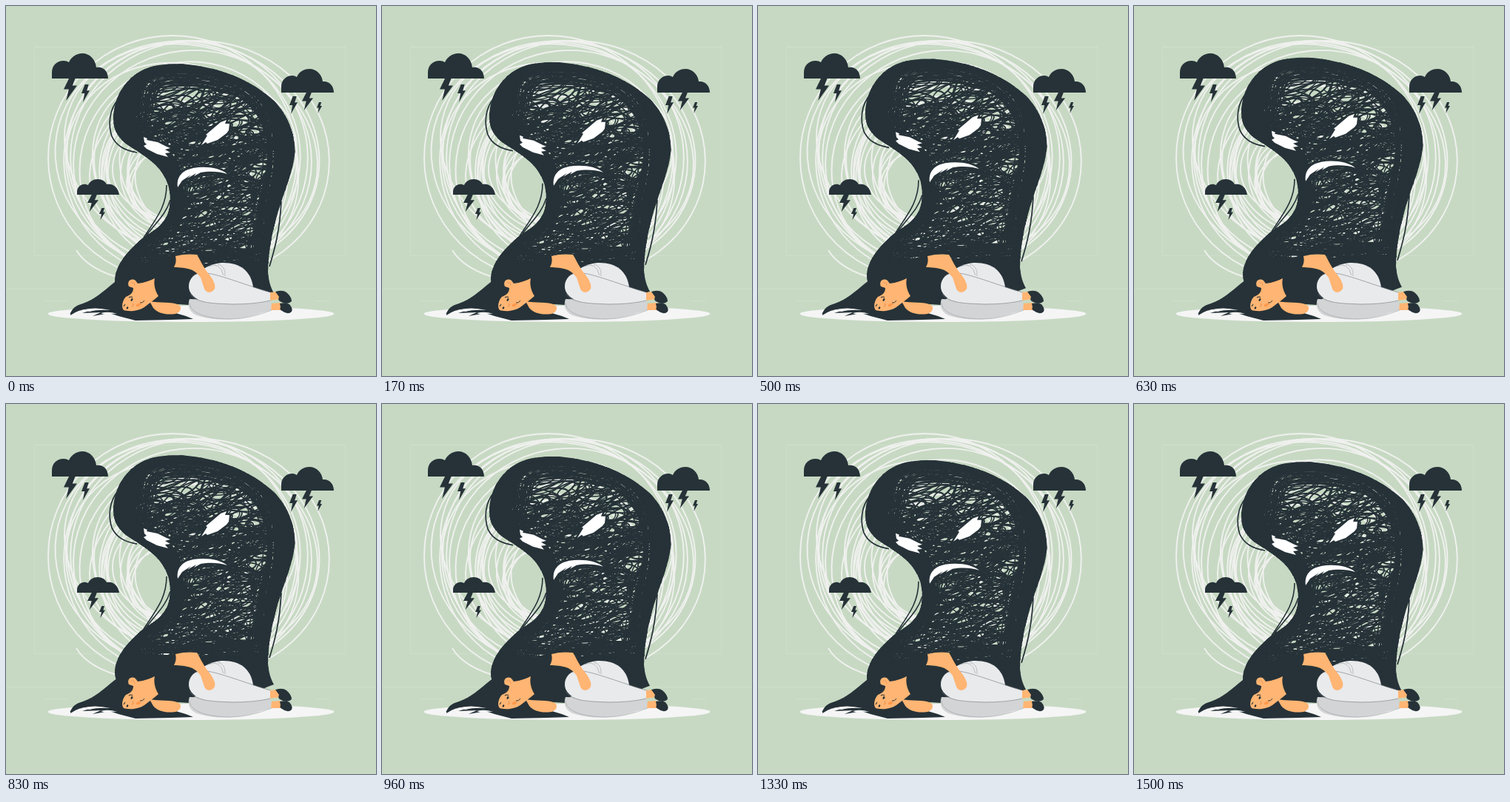
Write an HTML page with a canvas that moves like this. It is 500 px wide and 500 px high and loops after 1.54 s.

```html
<!DOCTYPE html>
<html lang="en">
<head>
<meta charset="utf-8">
<title>Dark cloud</title>
<style>
html, body { margin: 0; width: 100%; height: 100%; overflow: hidden; background: #c7d9c3; }
canvas { display: block; width: 500px; height: 500px; }
</style>
</head>
<body>
<canvas id="stage"></canvas>
<script>
const LOOP = 1540, FLOAT = 1500, STEP = 1000 / 24, LIFT = 10;
const DARK = '#263238', SKIN = '#ffb573', GREEN = '#c7d9c3', PALE = '#f0f1ef';
const canvas = document.getElementById('stage');
const ctx = canvas.getContext('2d');
const ratio = window.devicePixelRatio || 1;
canvas.width = canvas.height = 500 * ratio;

function seeded(seed) {
  return () => {
    seed = (seed * 1664525 + 1013904223) >>> 0;
    return seed / 4294967296;
  };
}

function fill(d, color) {
  ctx.fillStyle = color;
  ctx.fill(new Path2D(d));
}

function line(d, color, width) {
  ctx.strokeStyle = color;
  ctx.lineWidth = width;
  ctx.stroke(new Path2D(d));
}

function ellipse(x, y, rx, ry, turn = 0) {
  ctx.beginPath();
  ctx.ellipse(x, y, rx, ry, turn, 0, Math.PI * 2);
}

function dot(x, y, rx, ry, color, turn = 0) {
  ellipse(x, y, rx, ry, turn);
  ctx.fillStyle = color;
  ctx.fill();
}

// Backdrop loops: a few wide ones, then tighter ones drifting left.
const loops = [
  [225, 205, 168, 165, 0], [262, 207, 175, 160, .1], [245, 203, 179, 155, .15],
  [243, 207, 165, 160, -.2], [240, 200, 158, 150, .2], [252, 212, 161, 152, -.1],
  [250, 196, 174, 141, .32], [238, 220, 160, 140, .4]
];
const loopRandom = seeded(41);
for (let i = 0; i < 21; i++) {
  const r = 148 - i * 4.8;
  loops.push([243 - i * 1.4 + loopRandom() * 16, 206 + i * 1.3 + loopRandom() * 14,
    r, r * (.76 + loopRandom() * .24), loopRandom() * 1.8 - .7]);
}

// Strands knotted inside the creature, thinner at the upper left.
const random = seeded(7);
const strands = [];
for (let i = 0; i < 560; i++) {
  const x = 155 + random() * 220, y = 85 + random() * 275;
  const rx = 10 + random() * 40, ry = rx * (.2 + random() * .34);
  const turn = -.65 + random() * .85, width = 1.4 + random() * .9;
  const thin = y < 145 && x < 310 && random() < .5;
  if (!thin) strands.push({ x, y, rx, ry, turn, width });
}

// Strands that follow the knot's outline and thicken its rim.
const rims = [];
for (let i = 0; i < 26; i++) {
  rims.push({
    dx: random() * 12 - 6, dy: random() * 12 - 6,
    turn: random() * .1 - .05, scale: .86 + random() * .16
  });
}

const body = new Path2D(`M150 386 C146 374 146 365 151 354 C157 340 170 326 187 312
  C203 302 222 291 222 262 C222 246 217 232 207 220 C196 207 182 199 168 190
  C153 181 145 168 145 153 C145 127 158 99 187 85.5 C206 77 238 76 266 82
  C303 89 337 105 362 128 C380 146 391 172 390.5 198 C388 224 376 250 367 280
  C359 308 354 335 354 360 C355 372 358 381 362 388 L354 391 L340 397 L200 400 Z`);
const knot = new Path2D(`M182 130 C181 109 188 95 205 91 C240 85 279 92 310 103
  C338 115 357 142 361 175 C366 210 358 240 351 270 C347 294 348 320 342 346
  L250 352 L190 349 C178 342 178 327 192 317 C213 304 231 290 233 268
  C235 246 228 216 213 200 C195 184 172 168 175 150 Z`);
const shell = new Path2D(body);
shell.addPath(knot);

const FACE = [
  'M186 177 L191 179 L190 181 L205 184 L217 190 L222 192 L215 194 L222 198 L215 199 L219 204 L204 200 L190 193 L186 189 L190 187 L187 184 Z',
  'M264 188 L272 175 L270 174 L290 157 L298 154 L296 159 L302 159 L301 168 L298 172 L286 181 L272 186 L270 184 Z',
  'M232 245 C230 231 238 222 253 219 C270 216 290 219 299 227 C287 223 274 223 263 225 L254 230 L257 226 L245 233 L250 228 L238 236 Z'
];

function bolt(x, y, w, h) {
  const shape = [[.42, 0], [.88, 0], [.66, .34], [1, .34], [.18, 1], [.38, .5], [0, .5]];
  ctx.beginPath();
  for (const [u, v] of shape) ctx.lineTo(x + u * w, y + v * h);
  ctx.fillStyle = DARK;
  ctx.fill();
}

function clouds() {
  fill('M62 98 L62 90 C62 80 69 74 78 74 Q82 74 85 76 C88 69 95 64 103 64 C113 64 121 72 122 83 C131 81 138 88 138 98 Z', DARK);
  bolt(78, 97, 18, 31);
  bolt(102, 106, 11, 24);
  fill('M372 117 L372 109 C372 100 379 94 387 94 Q390 94 393 96 C396 89 402 85 410 85 C420 85 427 93 428 102 C437 101 443 108 443 117 Z', DARK);
  bolt(400, 116, 15, 25);
  bolt(383, 122, 11, 24);
  bolt(420, 130, 7, 15);
  fill('M96 255 L96 250 C97 244 102 240 108 241 L111 242 C113 237 118 234 124 234 C130 234 134 237 136 241 C145 239 152 246 153 255 Z', DARK);
  bolt(110, 254, 15, 24);
  bolt(126, 273, 8, 16);
}

function backdrop() {
  ctx.fillStyle = GREEN;
  ctx.fillRect(0, 0, 500, 500);
  line('M38.5 55.5 H458.5 V337.5 H38.5 Z M0 382.5 H500 M52 398.5 H84 M417 398.5 H438', '#cedeca', 1);
  ctx.strokeStyle = PALE;
  ctx.lineWidth = 1.9;
  for (const loop of loops) {
    ellipse(...loop);
    ctx.stroke();
  }
  line('M95 330 C107 350 132 362 160 369', PALE, 1.9);
  dot(250, 416, 193.5, 11, '#f5f5f5');
}

function tangle() {
  ctx.save();
  ctx.clip(body);
  ctx.strokeStyle = DARK;
  for (const s of strands) {
    ctx.lineWidth = s.width;
    ellipse(s.x, s.y, s.rx, s.ry, s.turn);
    ctx.stroke();
  }
  ctx.lineWidth = 1.8;
  for (const r of rims) {
    ctx.save();
    ctx.translate(275 + r.dx, 220 + r.dy);
    ctx.rotate(r.turn);
    ctx.scale(r.scale, r.scale);
    ctx.translate(-275, -220);
    ctx.stroke(knot);
    ctx.restore();
  }
  ctx.restore();
}

function creature(lift) {
  ctx.save();
  ctx.translate(0, -lift);
  line('M152 126 C139 140 138 161 143 176 C149 189 160 195 177 198', DARK, 1.7);
  line('M217 242 C217 270 204 286 186 313 M222 262 C216 282 203 292 190 310', DARK, 1.6);
  line('M372 264 C370 302 364 326 356 352', DARK, 1.7);
  ctx.fillStyle = DARK;
  ctx.fill(shell, 'evenodd');
  tangle();
  for (const d of FACE) {
    line(d, DARK, 5);
    fill(d, '#fff');
  }
  ctx.restore();
}

function woman() {
  // Hair and shirt
  fill(`M147 373 C160 366 170 358 185 351 C201 345 215 338 231 337 L248 348 L268 380 L248 404
    L232 403 L226 414 L243 419 L253 423 L222 424 L175 425 L152 419 L140 415 L117 419 L128 414
    L103 415 L119 410 Q100 408 87 418 Q88 406 104 402 C121 396 132 385 142 377 Z`, DARK);
  fill('M102 411 Q119 406 141 411 Q123 410 113 413 Z M128 415 Q139 412 150 416 Q139 415 134 417 Z', '#f5f5f5');
  line('M87 416 Q93 406 116 405', DARK, 1.4);
  // Lower arm
  fill('M194 399 C207 402 224 399 234 404 C238 408 236 414 229 416 C216 418 205 415 199 408 Z', SKIN);
  // Head
  fill(`M166 379 C163 372 169 367 175 371 L178 375 C187 374 195 371 201 368 C199 376 202 386 206 392
    C199 398 193 402 187 407 C178 413 165 413 159 411 C155 406 158 397 162 393 C170 390 172 386 172 381 Z`, SKIN);
  line('M169 374 Q174 373 174 378', '#e59153', .8);
  dot(179, 404, 3.4, 2, '#ff9a4f', -.4);
  dot(170, 397, 1.3, 2, DARK, .5);
  dot(164, 408, 1.2, 1.8, DARK, .5);
  line('M166 394 Q169 392 171 394 M159 406 L161 403', DARK, 1.1);
  line('M181 401 Q185 402 187 398', DARK, .9);
  line('M171 402 Q174 405 170 406', '#e07f40', .9);

  // Hips and legs
  fill('M254 369 C260 357 274 349 291 347 C315 346 331 357 334 380 L300 383 Z', '#e9eaec');
  line('M274 352 Q289 345 294 364 M286 349 Q297 351 296 365', '#a6abad', .7);
  fill('M248 396 C244 408 250 417 264 420 C289 427 325 423 344 415 L359 411 L358 399 L310 398 Z', '#d3d4d6');
  fill('M247 379 C247 367 257 358 272 360 C294 364 322 377 357 387 L357 398 C337 404 309 403 286 402 C264 402 247 393 247 379 Z', '#e9eaec');
  line('M254 364 C268 354 296 368 357 387 M249 389 C256 402 283 402 306 403 Q337 403 357 398', '#70797d', .6);
  line('M248 401 C249 419 282 423 304 423 Q328 423 359 411', '#8b9295', .5);

  // Upper arm
  fill(`M229 338 C239 335 250 335 258 336 C263 344 267 354 274 362 C279 368 284 377 282 382
    C279 388 271 389 268 382 L263 367 C254 354 243 354 227 353 Q231 346 229 338 Z`, SKIN);

  // Feet
  fill('M357 387 L367 386 L371 396 L357 398 Z M359 402 L371 401 L373 411 L358 411 Z', SKIN);
  fill('M364 386 Q374 383 379 387 Q386 393 386 399 Q380 405 370 399 Q367 397 369 393 Z', DARK);
  fill('M370 402 Q378 400 383 403 Q388 409 386 413 Q381 418 373 412 Q369 410 371 407 Z', DARK);
}

let shown = -1;
const start = performance.now();

function frame() {
  const time = (performance.now() - start) % LOOP;
  const step = Math.min(36, Math.floor((time + 5) / STEP));
  if (step !== shown) {
    shown = step;
    const phase = step * STEP / FLOAT;
    ctx.setTransform(ratio, 0, 0, ratio, 0, 0);
    backdrop();
    creature(LIFT * (1 - Math.abs(2 * phase - 1)));
    clouds();
    woman();
  }
  requestAnimationFrame(frame);
}
frame();
</script>
</body>
</html>
```
